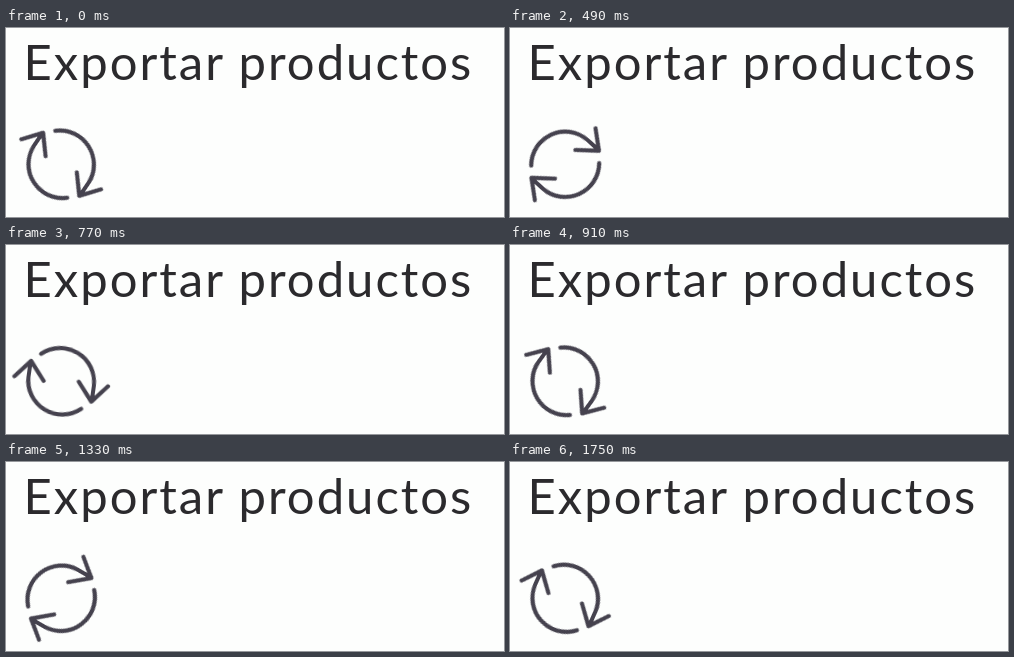
These frames come from a looping animation (498 by 189 pixels, 1820 ms). An HTML page:

```html
<!DOCTYPE html>
<html lang="es">
<head>
<meta charset="utf-8">
<title>Exportar productos</title>
<style>
  html, body { margin: 0; width: 100%; height: 100%; overflow: hidden; background: #fdfefd; }
  svg { display: block; width: 100vw; height: 100vh; }
  text { font: 400 49px Lato, "Open Sans", sans-serif; letter-spacing: 2px; fill: #2b2a2d; }
  .spinner {
    fill: none; stroke: #45424e; stroke-width: 4.2;
    stroke-linecap: round; stroke-linejoin: round;
    animation: spin 1820ms steps(26) infinite;
  }
  /* 200 degrees per second, slightly over one turn per loop */
  @keyframes spin {
    from { transform: rotate(-56deg); }
    to { transform: rotate(308deg); }
  }
</style>
</head>
<body>
<svg viewBox="0 0 498 189">
  <text x="17.5" y="52">Exportar productos</text>
  <g transform="translate(55.2 136.3)">
    <g class="spinner">
      <g id="arrow">
        <path d="M-24.5 23.6A34 34 0 0 1 0-33H15"/>
        <path d="M-1.5-47 16-32.6-2-17.5"/>
      </g>
      <use href="#arrow" transform="rotate(180)"/>
    </g>
  </g>
</svg>
</body>
</html>
```
